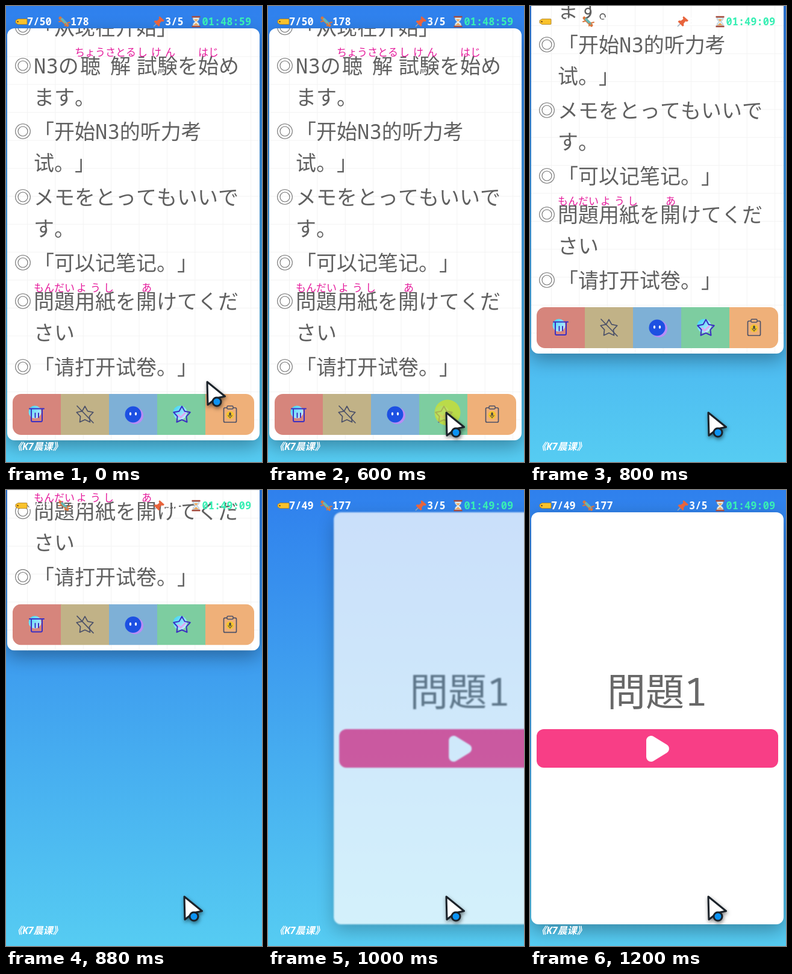
Write an HTML page that moves like this. It is 425 px wide and 757 px high and loops after 1.68 s.

```html
<!DOCTYPE html>
<html lang="ja">
<head>
<meta charset="utf-8">
<style>
html, body { margin: 0; width: 100%; height: 100%; overflow: hidden; }
body { position: relative; background: linear-gradient(#2f80ed, #56ccf2); }
svg { position: absolute; left: 0; top: 0; display: block; }
.card {
  position: absolute; left: 2px; top: 37px; width: 419px; height: 684px;
  border-radius: 12px; overflow: hidden; background: #fff;
  box-shadow: 0 10px 30px rgba(0, 0, 0, .33);
}
#page {
  background:
    linear-gradient(90deg, #f3f3f3 1.4px, transparent 1.4px) 33px 0,
    linear-gradient(#f3f3f3 1.4px, transparent 1.4px), #fff;
  background-size: 46.4px 46.4px;
}
text {
  font-family: "Noto Sans Mono", "Noto Sans CJK JP", "Noto Sans CJK SC", "Noto Sans CJK", monospace;
  white-space: pre; font-kerning: none; text-spacing-trim: space-all;
  font-feature-settings: "chws" 0, "halt" 0, "palt" 0;
}
.zh { font-family: "Noto Sans Mono", "Noto Sans CJK SC", "Noto Sans CJK", monospace; }
.line { font-size: 34px; fill: #606060; }
.ruby { font-size: 17px; fill: #e5199b; }
.head { font-size: 17px; font-weight: 700; fill: #fff; }
.foot { font: italic 700 16px "Open Sans", "Noto Sans CJK SC", "Noto Sans CJK", sans-serif; fill: #fff; }
.icon { fill: none; stroke: #3b2fc2; stroke-width: 2; stroke-linejoin: round; stroke-linecap: round; }
.dark { stroke: #4b5068; stroke-width: 1.7; }
</style>
</head>
<body>
<div class="card" id="next">
  <svg width="419" height="684" viewBox="2 37 419 684">
    <text x="128" y="358" font-size="64" fill="#686868">問題1</text>
    <rect x="11" y="397" width="401" height="64" rx="12" fill="#f83e86"/>
    <path d="M201 416V443L223 429.5Z" fill="#fff" stroke="#fff" stroke-width="16" stroke-linejoin="round"/>
  </svg>
</div>

<div class="card" id="page">
  <svg width="419" height="684" viewBox="2 37 419 684">
    <defs>
      <linearGradient id="aqua" x1="0" y1="0" x2="1" y2="1">
        <stop offset="0" stop-color="#35d5f5"/><stop offset="1" stop-color="#d5edff"/>
      </linearGradient>
      <clipPath id="bar"><rect x="11" y="644" width="401" height="68" rx="14"/></clipPath>
    </defs>
    <g id="lines"></g>
    <g id="tiles" clip-path="url(#bar)"></g>

    <circle cx="48" cy="674" r="10.5" fill="url(#aqua)"/>
    <path class="icon" d="M39 668.5H63M42 668.5V688Q42 690 44 690H58Q60 690 60 688V668.5M48.500 676V683M54 676V683"/>

    <path class="icon dark star" transform="translate(131 679)"/>
    <path class="icon dark" d="M118 664L145 692"/>

    <circle cx="214" cy="680" r="14" fill="#b88cf6"/>
    <circle cx="211" cy="678" r="13.5" fill="#1d50e2"/>
    <g fill="#fff"><ellipse cx="206.5" cy="677" rx="1.7" ry="2.7"/><ellipse cx="215.5" cy="677" rx="1.7" ry="2.7"/></g>

    <circle cx="289" cy="675" r="11.5" fill="url(#aqua)"/>
    <path d="M285 678l5 5l8-8" fill="none" stroke="#dfa6f0" stroke-width="3"/>
    <path class="icon star" transform="translate(292 679)"/>

    <rect class="icon dark" x="361.5" y="667" width="21" height="24" rx="2"/>
    <rect x="367" y="664" width="10" height="5" rx="1.5" fill="#efb079" stroke="#4b5068" stroke-width="1.5"/>
    <circle cx="372" cy="679" r="6.5" fill="#f6c52c"/>
    <rect x="370.4" y="674.5" width="3.2" height="6" rx="1.6" fill="#444"/>
    <path d="M368.8 679q0 3.5 3.2 3.5t3.2-3.5M372 682.5v2" fill="none" stroke="#444"/>

    <circle id="tap" cx="298" cy="675" r="21.5" fill="#cfe02c" opacity=".75"/>
  </svg>
</div>

<svg width="425" height="757" viewBox="0 0 425 757">
  <path d="M16 24l4-2.5h14q1 0 1 1v7q0 1-1 1H20l-4-2.5Z" fill="#f9c22b" stroke="#a8781c" stroke-width=".8"/>
  <circle cx="19.5" cy="26" r="1.3" fill="#7a4c16"/>
  <g fill="none" stroke-linecap="round">
    <path d="M90 20L102 32" stroke="#d9773f" stroke-width="5"/>
    <path d="M93 22L100 29" stroke="#66b7b4" stroke-width="4"/>
    <path d="M88 26l4-1M98 33l1-4M102 28l4-1" stroke="#d9773f" stroke-width="2"/>
  </g>
  <path d="M245 34L252 27" stroke="#9aa7b5" stroke-width="1.5"/>
  <path d="M255 17l8 7l-2 2l-3-.5l-3 4l.5 3l-2 1.5l-8-8l2-2l3 .5l4-3l-1-2.5Z" fill="#e8643c"/>
  <path d="M310 19H321Q321 24 317 26Q321 28 321 33H310Q310 28 314 26Q310 24 310 19Z" fill="#dcecf5" stroke="#9fb4c4" stroke-width=".8"/>
  <path d="M312 22H319L315.5 26ZM311 32L315.5 28L320 32Z" fill="#efa75c"/>
  <path d="M308.5 18H322.5M308.5 34H322.5" stroke="#a64b3c" stroke-width="2.6"/>
  <text class="head" id="left" x="35" y="32"></text>
  <text class="head" id="total" x="107" y="32"></text>
  <text class="head" x="264" y="32">3/5</text>
  <text class="head" id="clock" x="325.5" y="32" style="fill:#38efb4"></text>
  <text class="foot" x="11" y="737">《K7晨课》</text>
  <g id="cursor" style="filter:drop-shadow(1px 3px 3px rgba(0,0,0,.5))" stroke="#1b2229" stroke-width="3" stroke-linejoin="round">
    <path d="M0 1L29.5 25L15 28L1 39Z" fill="#fff"/>
    <circle cx="16" cy="34" r="7" fill="#0c93f4"/>
  </g>
</svg>

<script>
const $ = id => document.getElementById(id);
const add = (id, html) => $(id).insertAdjacentHTML('beforeend', html);
const text = (cls, x, y, s) => add('lines', `<text class="${cls}" x="${x}" y="${y}">${s}</text>`);
const line = (y, s, x = 46) => text('line', x, y + 13, s);
const zh = (y, s) => text('line zh', 46, y + 13, s);
const ruby = (y, s, x) => text('ruby', x, y, s);

for (const y of [35.5, 99, 208, 317, 426, 490, 599])
  add('lines', [12.3, 8].map(r => `<circle cx="28" cy="${y}" r="${r}" fill="none" stroke="#6c6c6c" stroke-width="1.1"/>`).join(''));

zh(35, '「从现在开始」');
line(99, 'N3の');
line(99, '聴解試験を始め', '123 173 217');
line(151, 'ます。');
zh(208, '「开始N3的听力考');
zh(260, '试。」');
line(317, 'メモをとってもいいで');
line(369, 'す。');
zh(426, '「可以记笔记。」');
line(490, '問題用紙を開けてくだ');
line(542, 'さい');
zh(599, '「请打开试卷。」');
ruby(83, 'ちょうさとる', 114);
ruby(83, 'しけん', '218 241 264');
ruby(83, 'はじ', 319);
ruby(474, 'もんだい', 46);
ruby(474, 'ようし', '117 140 162');
ruby(474, 'あ', 225);

['#d6857c', '#c1b287', '#7eb0d6', '#7dcda0', '#efb079'].forEach((c, i) =>
  add('tiles', `<rect x="${11 + i * 80}" y="644" width="81" height="68" fill="${c}"/>`));

const star = Array.from({ length: 10 }, (_, i) => {
  const r = i % 2 ? 7.8 : 14.5, a = (i * 36 - 90) * Math.PI / 180;
  return `${r * Math.cos(a)} ${r * Math.sin(a)}`;
});
document.querySelectorAll('.star').forEach(p => p.setAttribute('d', `M${star.join('L')}Z`));

const clamp = v => Math.max(0, Math.min(1, v));
const steps = [0, 80, 160, 200, 280, 600, 720, 800, 880, 920, 1000, 1040, 1120, 1200];

function draw(now) {
  const t = steps.filter(s => s <= now % 1680).pop();

  const p = clamp((t - 40) / 240), e = p * p * (3 - 2 * p);
  $('cursor').setAttribute('transform', `translate(${334 - 38 * e} ${623 + 51 * e})`);
  $('tap').style.display = t === 600 ? '' : 'none';

  // first card accelerates upwards, second eases in from the right
  const up = 144 * (Math.max(0, t - 697) / 103) ** 2;
  $('page').style.transform = `translateY(${-up}px)`;
  $('page').style.visibility = up > 800 ? 'hidden' : '';

  const away = (1 - clamp((t - 880) / 320)) ** 2.9;
  const next = $('next').style;
  next.transform = `translateX(${419 * away}px)`;
  next.opacity = 1 - away;
  next.filter = away ? `blur(${5 * away}px)` : 'none';

  const done = t >= 720;
  $('left').textContent = done ? '7/49' : '7/50';
  $('total').textContent = done ? '177' : '178';
  $('clock').textContent = done ? '01:49:09' : '01:48:59';
}

const start = performance.now();
(function loop() {
  draw(performance.now() - start);
  requestAnimationFrame(loop);
})();
</script>
</body>
</html>
```
